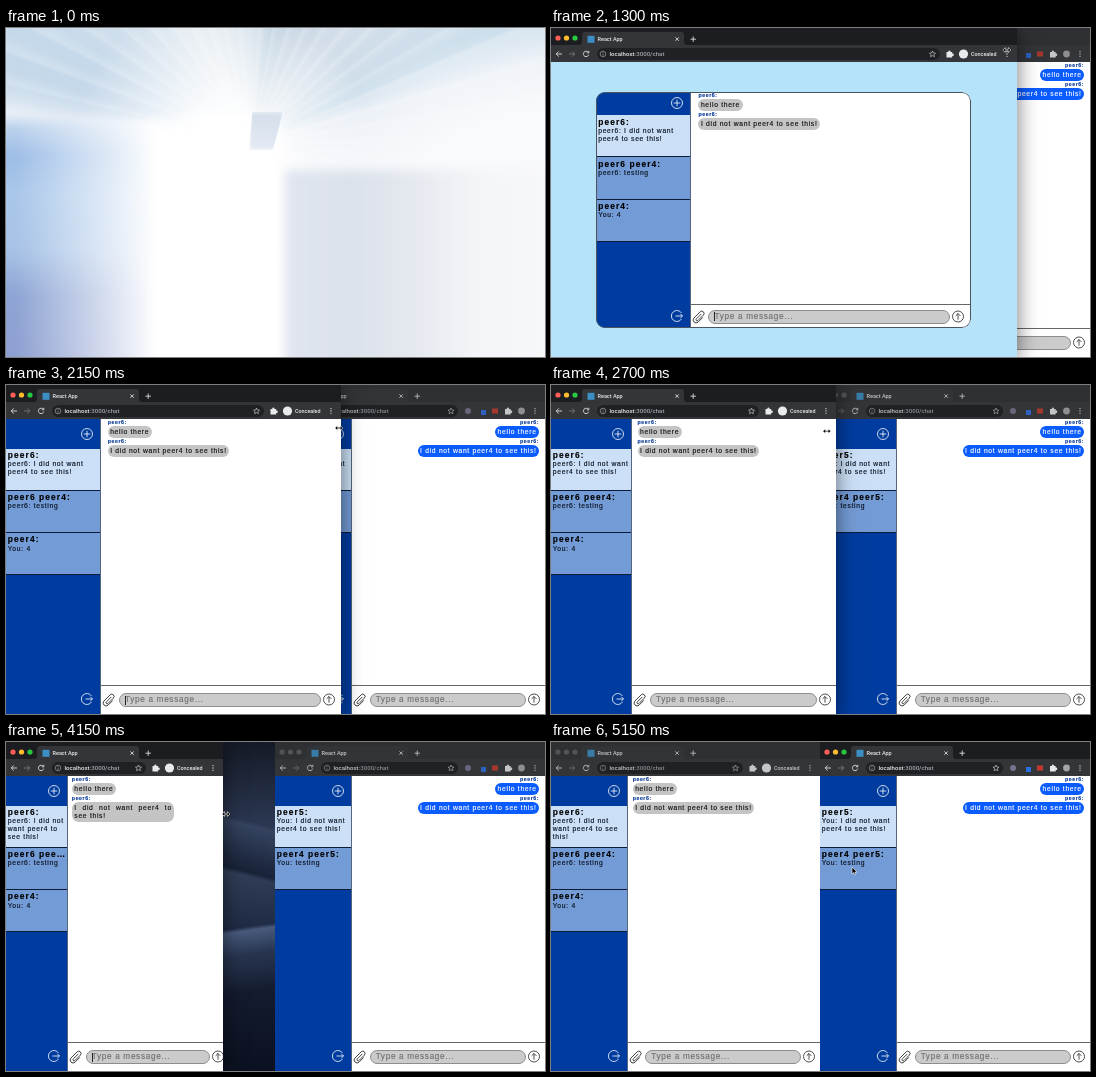
Animation of 539 by 329 pixels, one loop 5.2 s. Source, as an HTML page:

```html
<!DOCTYPE html>
<html lang="en">
<head>
<meta charset="utf-8">
<title>Chat in two windows</title>
<style>
html, body { margin: 0; width: 100%; height: 100%; overflow: hidden; }
#stage { position: relative; width: 539px; height: 329px; overflow: hidden;
  background: linear-gradient(172deg, transparent 54%, #485a7c 55%, #27344f 61%, transparent 70%),
    linear-gradient(14deg, transparent 55%, #182238 56%, #35435f 66%, transparent 67%),
    linear-gradient(#151a26, #2a3650 24%, #35425c 36%, #1d2942 58%, #151d31 72%, #0b1120); }
#stage *, .win { box-sizing: border-box; }
svg { position: absolute; overflow: visible; }

/* browser window */
.win { position: absolute; top: 0; height: 329px; overflow: hidden; background: #b5e4fa; }
#front { left: 0; box-shadow: 0 4px 20px #0008; }
#front.off { box-shadow: none; }
#back { left: 269px; width: 270px; }
.bar { position: absolute; inset: 0 0 auto; height: 34px; background: linear-gradient(#1c1d20 17px, #343539 0);
  font-family: Roboto, Arial, sans-serif; font-weight: 500; }
.off .bar { background: linear-gradient(#2f3034 17px, #343539 0); }
.off .light { fill: #5d5e62; }
.off .bar svg { opacity: .8; }
.bar .right { right: 0; top: 0; }
.url { position: absolute; left: 46px; top: 20px; height: 12px; border-radius: 6px; background: #202124; }

/* chat page */
.app { position: absolute; left: calc(10% - 1.2px); top: 63.7px; width: calc(80% + 1.2px); height: 236px;
  overflow: hidden; border-radius: 9px; background: #fff; font: 6.75px "Liberation Sans", Arial, sans-serif;
  letter-spacing: .69px; -webkit-text-stroke: .15px; --side: 25%; }
.app::after { content: ""; position: absolute; inset: 0; border: 1px solid #4b5560; border-radius: 9px; }
.small .app { left: 0; top: 34px; width: 100%; height: 295px; border-radius: 0; --side: 28.2%; }
.small .app::after { display: none; }
.side { position: absolute; inset: 0 auto 0 0; width: var(--side); background: #003c9f; }
.head { height: 10%; }
.item { height: 42.2px; padding: 2.6px 1.5px 0 1.8px; overflow: hidden; background: #739bd5;
  border-bottom: 1px solid #0b1b3a; line-height: 7.7px; color: #0a1220; }
.item.on { background: #cbe0f7; }
.item b { display: block; overflow: hidden; white-space: nowrap; text-overflow: ellipsis;
  font-size: 8.4px; line-height: 9.2px; letter-spacing: 1.1px; color: #000; }
.side svg { right: 7px; width: 12px; height: 12px; }
.add { top: calc(5% - 6px); }
.exit { bottom: calc(5% - 6px); }
.main { position: absolute; inset: 0 0 0 var(--side); box-shadow: inset 1px 0 #56657d; }
.log { padding: .4px 3%; display: flex; flex-direction: column; align-items: flex-start; }
.log i { font: bold 5.2px/6.8px "Liberation Sans", Arial, sans-serif; letter-spacing: .6px; color: #0a3c98; }
.log p { margin: 0 0 .4px; padding: 2px 2.5px; max-width: 70%; border-radius: 6.5px; background: #c4c4c4;
  line-height: 7.9px; text-align: justify; color: #111; }
#back .log { align-items: flex-end; }
#back .log p { background: #0a5cff; color: #fff; }
.foot { position: absolute; inset: auto 0 0; height: 10%; border-top: 1px solid #666;
  --gap: min(19% - 17px, 2.24% + 14.8px); }
.foot > * { position: absolute; top: calc(50% - 6.5px); }
.clip { left: 2px; width: 13px; height: 13px; }
.send { right: calc(var(--gap) - 14px); width: 12px; height: 13px; }
.field { left: 18.5px; right: var(--gap); height: 14px; overflow: hidden; border: 1px solid #8d8d8d; border-radius: 7px;
  background: #cbcbcb; padding-left: 5px; font-size: 8.2px; line-height: 12.5px; white-space: nowrap; color: #707070; }
.caret { position: absolute; left: 5px; top: 1.5px; width: 1px; height: 9px; background: #222; }

/* opening picture */
#glow { position: absolute; inset: 0; overflow: hidden;
  background: radial-gradient(circle at 215px 120px, #fff 30px, #fff0 150px),
    repeating-conic-gradient(at 245px 115px, #fff0 0 3deg, #fff3 4deg, #fff0 7deg),
    conic-gradient(at 245px 115px, #d3e0ea, #bccfdf 10deg, #c8d6e3 22deg, #d3deea 38deg, #d0deea 52deg,
      #cddfec 66deg, #e6ecf4 74deg, #eef1f8 95deg, #fff 180deg 270deg, #c5d8ea 285deg, #c6d9ea 297deg,
      #d2e0ec 315deg, #e3eaf0 335deg, #dde6ed 347deg, #d3e0ea); }
#glow div { position: absolute; }
.fade { inset: 0; background: radial-gradient(ellipse 260px 190px at 539px 190px, #f9fafc 55%, #f9fafc00); }
.shade { left: -10px; top: 92px; width: 165px; height: 250px; filter: blur(5px);
  background: linear-gradient(90deg, #fff0 12%, #fff 98%),
    linear-gradient(#c5d8ee, #9dbde6 14%, #a9c7ea 30%, #a6c2e6 52%, #8ea4d4 70%, #8d9ed0); }
.wall { left: 275px; top: 142px; width: 290px; height: 210px; filter: blur(5px);
  background: linear-gradient(90deg, #e0e5f0, #dce2eb 25%, #e3e7ee 42%, #f3f5f8 68%, #f8f9fb); }
.door { left: 160px; top: 104px; width: 106px; height: 250px; background: #fff; box-shadow: 0 0 16px 10px #fff; }
.notch { left: 243px; top: 84px; width: 34px; height: 38px; filter: blur(2px); clip-path: polygon(10% 0, 100% 0, 70% 100%, 0 100%);
  background: linear-gradient(#d3dfeb, #e4eaf4); }
#pointer { left: 0; top: 0; }
</style>
</head>
<body>
<div id="stage">
  <div id="back" class="win small off"></div>
  <div id="front" class="win"></div>
  <svg id="pointer" width="1" height="1" stroke="#fff" stroke-width=".6">
    <path id="resize" d="M-4 0-1.5-2.4V-.7H1.5V-2.4L4 0 1.5 2.4V.7H-1.5V2.4Z"/>
    <path id="arrow" d="M0-3V4L1.6 2.6 2.7 5 3.8 4.5 2.8 2.1H5Z"/>
  </svg>
  <div id="glow">
    <div class="fade"></div><div class="shade"></div><div class="wall"></div>
    <div class="door"></div><div class="notch"></div>
  </div>
</div>
<script>
const $ = id => document.getElementById(id);
const dot = (x, y, r, fill, cls = '') => `<circle class="${cls}" cx="${x}" cy="${y}" r="${r}" fill="${fill}"/>`;
const line = (d, color = '#dcdde0', width = .9) =>
  `<path d="${d}" fill="none" stroke="${color}" stroke-width="${width}"/>`;
const label = (x, y, size, words, fill = '#e8eaed') =>
  `<text x="${x}" y="${y}" font-size="${size}" fill="${fill}">${words}</text>`;

// x positions below are distances from the window's right edge
const star = x => line(`M${-x} 23l.9 2 2.1.2-1.6 1.4.5 2.1-1.9-1.1-1.9 1.1.5-2.1-1.6-1.4 2.1-.2z`, '#dcdde0', .6);
const puzzle = x => `<path fill="#e8eaed" d="M${-x - 3} 24h1.9a1.1 1.1 0 1 1 2 0h1.8v1.8a1.1 1.1 0 1 1 0 2v1.6h-5.7z"/>`;
const dots = x => [23.7, 26, 28.3].map(y => dot(-x, y, .65, '#dcdde0')).join('');

const privateTools = star(84.5) + puzzle(67.5) + dot(-53.5, 26, 4.6, '#e8eaed') + label(-46, 28, 5.4, 'Concealed') + dots(10);
const plainTools = star(94) + dot(-77, 26, 3, '#77738f') + '<rect x="-64" y="25" width="5" height="5" fill="#2a6fe0"/>' +
  '<rect x="-53" y="23.5" width="6" height="5" fill="#c0392b"/>' + puzzle(37) + dot(-23.5, 26, 3.4, '#a5a5a5') + dots(10);

function bar(tools, urlRight) {
  return `<div class="bar"><div class="url" style="right:${urlRight}px"></div>
    <svg width="150" height="34">
      ${dot(7, 10, 2.6, '#ff5f57', 'light')}${dot(15.5, 10, 2.6, '#febc2e', 'light')}${dot(24, 10, 2.6, '#28c840', 'light')}
      <path d="M28 17q3 0 3-3V7q0-3 3-3h96q3 0 3 3v7q0 3 3 3z" fill="#343539"/>
      <rect x="36.5" y="7.8" width="7" height="7" fill="#3b8fc4"/>
      ${label(46.5, 13.3, 5.5, 'React App')}
      ${line('M124.4 9.4l3.4 3.4m0-3.4l-3.4 3.4M139.5 11.2h5.4m-2.7-2.7v5.4')}
      ${line('M11 26H5.2m2.6-2.6L5.2 26l2.6 2.6')}
      ${line('M18 26h5.8m-2.6-2.6l2.6 2.6-2.6 2.6', '#77787c')}
      ${line('M37.3 24.4a2.7 2.7 0 1 0 .4 2.2M37.8 22.8v2h-2')}
      ${line('M49.2 26a2.8 2.8 0 1 0 5.6 0a2.8 2.8 0 1 0-5.6 0M52 25.6v2M52 24.2v.7', '#b5b7bb', .6)}
      ${label(58.5, 28.2, 6.1, 'localhost<tspan fill="#a4a7ac">:3000/chat</tspan>')}
    </svg>
    <svg class="right" width="1" height="34"><g transform="translate(1)">${tools}</g></svg></div>`;
}

const ring = 'M.5 6a5.5 5.5 0 1 0 11 0a5.5 5.5 0 1 0-11 0';
const icon = (cls, d, color) => `<svg class="${cls}" viewBox="0 0 12 12">${line(d, color, .8)}</svg>`;

function page(chats) {
  const items = chats.map(([who, last], i) => `<div class="item ${i ? '' : 'on'}"><b>${who}:</b>${last}</div>`).join('');
  const log = ['hello there', secret].map(text => `<i>peer6:</i><p>${text}</p>`).join('');
  return `<div class="app">
    <div class="side"><div class="head"></div>${items}
      ${icon('add', ring + 'M6 2.7v6.6M2.7 6h6.6', '#fff')}
      ${icon('exit', 'M10.5 3A5.5 5.5 0 1 0 10.5 9M4.5 6h7M9.3 3.8L11.5 6 9.3 8.2', '#fff')}</div>
    <div class="main"><div class="log">${log}</div>
      <div class="foot">
        ${icon('clip', 'M8.6 3.6L4 8.2a1 1 0 0 0 1.5 1.5l5-5a2.1 2.1 0 0 0-3-3L1.7 7.5a2.7 2.7 0 0 0 3.8 3.8L10 6.8', '#222')}
        <div class="field">Type a message...<span class="caret"></span></div>
        ${icon('send', ring + 'M6 9.2V3M3.6 5.4L6 3l2.4 2.4', '#222')}
      </div></div></div>`;
}

const secret = 'I did not want peer4 to see this!';
const front = $('front'), back = $('back');
front.innerHTML = bar(privateTools, 77) +
  page([['peer6', 'peer6: ' + secret], ['peer6 peer4', 'peer6: testing'], ['peer4', 'You: 4']]);
back.innerHTML = bar(plainTools, 87) + page([['peer5', 'You: ' + secret], ['peer4 peer5', 'You: testing']]);
back.querySelector('.caret').remove();
const caret = front.querySelector('.caret');

// time, window width, pointer x, pointer y
const path = [
  [0, 539, 526, 31], [600, 536, 524, 31], [650, 535, 523, 31], [1300, 466.5, 456, 22], [2150, 335, 333, 43],
  [3200, 240, 224, 49], [4150, 217, 220, 72], [4300, 217, 219, 74], [4850, 269, 269, 90],
  [5150, 269, 301, 128], [5200, 269, 302, 128]
];

function at(t) {
  const i = path.findIndex(key => key[0] > t), a = path[i - 1], b = path[i];
  const k = (t - a[0]) / (b[0] - a[0]);
  return a.map((v, j) => v + (b[j] - v) * k);
}

function frame(now) {
  const t = Math.max(0, now) % 5200;
  const [, width, x, y] = at(t);
  const switched = t >= 5000, free = t >= 4880;
  $('glow').style.display = t < 50 ? '' : 'none';
  front.style.width = width + 'px';
  front.classList.toggle('small', width < 380);
  front.classList.toggle('off', switched);
  back.classList.toggle('off', !switched);
  caret.style.display = !switched && (t + 850) % 1000 <= 500 ? '' : 'none';
  $('pointer').style.transform = `translate(${x}px, ${y}px)`;
  $('resize').style.display = free ? 'none' : '';
  $('arrow').style.display = free ? '' : 'none';
  requestAnimationFrame(frame);
}
requestAnimationFrame(frame);
</script>
</body>
</html>
```
